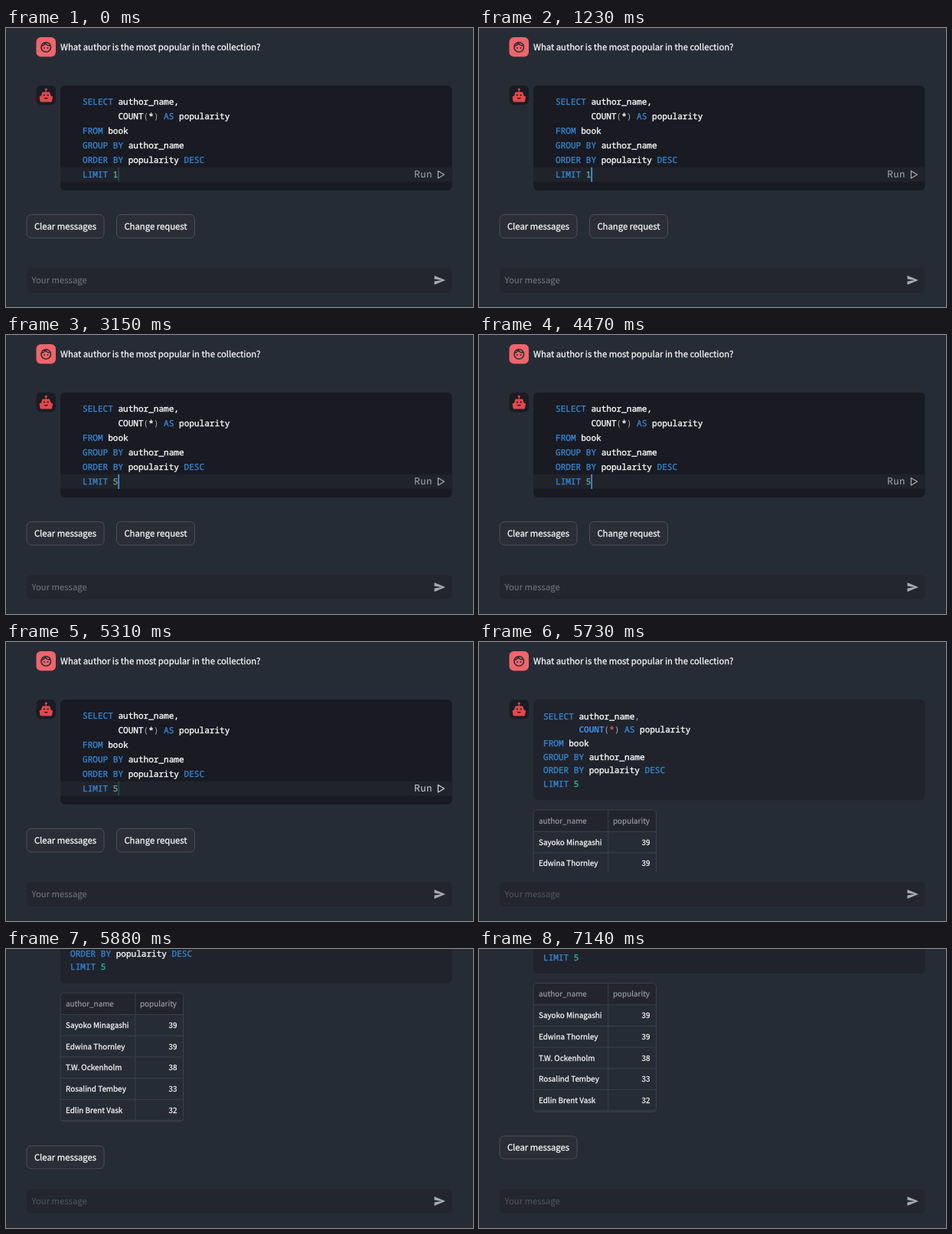
Recreate the animation shown at these times as an HTML page. Size 610 px wide and 364 px high, loop 7.98 s.

```html
<!DOCTYPE html>
<html lang="en">
<head>
<meta charset="utf-8">
<title>SQL chat</title>
<style>
  html, body { margin: 0; width: 100%; height: 100%; overflow: hidden; background: #262c35; }
  svg { display: block; width: 610px; height: 364px; }
  text, tspan { fill: currentColor; stroke: currentColor; }
  text {
    font: 11.3px "Noto Sans CJK JP", "Noto Sans CJK SC", "Noto Sans CJK KR", "Noto Sans CJK", Lato, sans-serif;
    color: #fafafa; stroke-width: .25px;
    text-rendering: geometricPrecision;
  }
  .code text { font: 500 11.05px "Noto Sans Mono", "DejaVu Sans Mono", monospace; stroke-width: .35px; }
  .code .key { color: #3585cf; }
  .code .fn { color: #3c8ee6; font-weight: 700; stroke: none; }
  .code .dim { color: #a3a8b0; stroke: none; }
  .code .star { color: #dd5653; }
  .code .num { color: #5fb08d; }
  .code .teal { color: #2bb89c; }
  .table text { font-size: 9.9px; }
  .table .head { color: #a2a5ab; stroke-width: .1px; }
  .table .count { text-anchor: end; }
  .line { fill: none; stroke: #3b4049; }
  .button rect { fill: #2b2e37; stroke: #4b4f58; }
  .button text { text-anchor: middle; }
  .run text { font-size: 12.2px; letter-spacing: .4px; color: #a9abb1; stroke: none; }
  .run path { fill: none; stroke: #a9abb1; stroke-width: 1.2; stroke-linejoin: round; }

  /* One loop is 7980 ms: 1% = 79.8 ms */
  .caret, .caret-spot, .caret-idle, .digit-old, .digit-new, .editor, .result, .scroll, .hint, .run {
    animation: 7980ms step-end infinite;
  }
  .caret { animation-name: blink; animation-timing-function: linear; }
  .caret-spot { animation-name: caret-spot; }
  .caret-idle { animation-name: idle; }
  .digit-old { animation-name: digit-old; }
  .digit-new { animation-name: digit-new; }
  .editor { animation-name: editor; }
  .result { animation-name: result; }
  .scroll { animation-name: scroll; }
  .hint { animation-name: hint; stroke-width: .1px; }
  .run { animation-name: hover; animation-timing-function: linear; }

  @keyframes blink {
    0%, 15.40% { opacity: 0; }
    15.41%, 20.67% { opacity: 1; }
    21.80%, 24.81% { opacity: 0; }
    26.69%, 34.96% { opacity: 1; }
    35.71%, 39.46% { opacity: 0; }
    39.47%, 44.73% { opacity: 1; }
    46.61%, 49.24% { opacity: 0; }
    50.75%, 56.01% { opacity: 1; }
    57.51%, 60.52% { opacity: 0; }
    62.03%, 66.53% { opacity: 1; }
    66.54%, 100% { opacity: 0; }
  }
  @keyframes caret-spot {
    0%, 39.47% { transform: none; }
    29.69% { transform: translateX(-6.63px); }
    100% { transform: none; }
  }
  @keyframes idle {
    0%, 66.54% { opacity: 1; }
    15.41%, 100% { opacity: 0; }
  }
  @keyframes digit-old { 0% { opacity: 1; } 29.69%, 100% { opacity: 0; } }
  @keyframes digit-new { 0% { opacity: 0; } 39.47%, 100% { opacity: 1; } }
  @keyframes editor { 0% { visibility: visible; } 71.80%, 100% { visibility: hidden; } }
  @keyframes result { 0% { visibility: hidden; } 71.80%, 100% { visibility: visible; } }
  @keyframes scroll {
    0% { transform: none; }
    71.96% { transform: none; animation-timing-function: cubic-bezier(.25, .46, .45, .94); }
    74.34%, 100% { transform: translateY(-174.5px); }
  }
  @keyframes hint { 0% { color: #70737a; } 71.80%, 100% { color: #4f535b; } }
  @keyframes hover {
    0%, 60.52% { filter: brightness(1); }
    62.03%, 100% { filter: brightness(1.25); }
  }
</style>
</head>
<body>
<svg viewBox="0 0 610 364">
  <defs>
    <clipPath id="view"><rect width="610" height="300"/></clipPath>
    <clipPath id="table-shape"><rect x="71" y="219" width="160.5" height="168" rx="5"/></clipPath>
  </defs>
  <rect width="610" height="364" fill="#262c35"/>

  <g clip-path="url(#view)">
    <g class="scroll">
      <rect x="39.5" y="12" width="25.5" height="25.5" rx="6" fill="#f0656c"/>
      <g fill="none" stroke="#2b2930" stroke-width="1.5">
        <circle cx="52.2" cy="25" r="6.3"/>
        <path d="M46.3 23.6Q50 23 51.2 19.8Q53.5 23.2 58.2 22.8"/>
      </g>
      <g fill="#2b2930"><circle cx="50" cy="26" r="1"/><circle cx="54.5" cy="26" r="1"/></g>
      <text x="71" y="29">What author is the most popular in the collection?</text>

      <rect x="39.5" y="75" width="25.5" height="25.5" rx="6" fill="#1a1c24"/>
      <g fill="#e5484d" stroke="#e5484d" stroke-linejoin="round">
        <circle cx="52.3" cy="80.2" r="1.1"/>
        <path d="M52.3 80V84M47.8 84H56.8L58 88.6L60.6 89.8L59.4 96H45.2L44 89.8L46.6 88.6Z"/>
      </g>
      <g fill="#1a1c24">
        <circle cx="49.9" cy="87.6" r="1.1"/><circle cx="54.7" cy="87.6" r="1.1"/>
        <path d="M49.4 91H55.2Q52.3 94.4 49.4 91Z"/>
      </g>

      <g class="editor">
        <rect x="71" y="75" width="511.5" height="137" rx="6" fill="#191a22"/>
        <rect x="71" y="181.7" width="511.5" height="19" fill="#21232b"/>
        <g class="code">
          <text x="100" y="100.3"><tspan class="key">SELECT</tspan> author_name,</text>
          <text x="146.4" y="119.2">COUNT<tspan class="dim">(</tspan>*<tspan class="dim">)</tspan> <tspan class="key">AS</tspan> popularity</text>
          <text x="100" y="138.2"><tspan class="key">FROM</tspan> book</text>
          <text x="100" y="157.1"><tspan class="key">GROUP BY</tspan> author_name</text>
          <text x="100" y="176.1"><tspan class="key">ORDER BY</tspan> popularity <tspan class="key">DESC</tspan></text>
          <text x="100" y="195" class="key">LIMIT</text>
          <text x="139.8" y="195" class="num digit-old">1</text>
          <text x="139.8" y="195" class="num digit-new">5</text>
        </g>
        <rect class="caret-idle" x="146.6" y="182" width="1" height="18.6" fill="#2c6470"/>
        <g class="caret-spot">
          <rect class="caret" x="146.4" y="181.8" width="1.6" height="19" fill="#4a9ae0"/>
        </g>
        <g class="run">
          <text x="533" y="195.3">Run</text>
          <path d="M564.4 186.4L572.4 191.2L564.4 196Z"/>
        </g>
        <g class="button">
          <rect x="27" y="243.5" width="101" height="30.5" rx="6"/>
          <text x="77.5" y="263">Clear messages</text>
        </g>
        <g class="button">
          <rect x="144.5" y="243.5" width="102" height="30.5" rx="6"/>
          <text x="195.5" y="263">Change request</text>
        </g>
      </g>

      <g class="result">
        <rect x="71" y="75" width="511.5" height="131.5" rx="6" fill="#20232c"/>
        <g class="code">
          <text x="84" y="100.8"><tspan class="key">SELECT</tspan> author_name<tspan class="dim">,</tspan></text>
          <text x="130.4" y="118.4"><tspan class="fn">COUNT</tspan><tspan class="dim">(</tspan><tspan class="star">*</tspan><tspan class="dim">)</tspan> <tspan class="key">AS</tspan> popularity</text>
          <text x="84" y="136.1"><tspan class="key">FROM</tspan> book</text>
          <text x="84" y="153.7"><tspan class="key">GROUP BY</tspan> author_name</text>
          <text x="84" y="171.4"><tspan class="key">ORDER BY</tspan> popularity <tspan class="key">DESC</tspan></text>
          <text x="84" y="189"><tspan class="key">LIMIT</tspan> <tspan class="teal">5</tspan></text>
        </g>
        <g class="table">
          <rect x="71" y="219" width="160.5" height="28.3" fill="#22252e" clip-path="url(#table-shape)"/>
          <path class="line" d="M71 247.3h160.5M71 275h160.5M71 302.7h160.5M71 330.4h160.5M71 358.1h160.5M71 385.3h160.5M168.8 219v166.3"/>
          <rect class="line" x="71" y="219" width="160.5" height="168" rx="5"/>
          <text class="head" x="78" y="236.8">author_name</text>
          <text class="head" x="175" y="236.8">popularity</text>
          <text x="78" y="264.6">Sayoko Minagashi</text><text class="count" x="223.5" y="264.6">39</text>
          <text x="78" y="292.3">Edwina Thornley</text><text class="count" x="223.5" y="292.3">39</text>
          <text x="78" y="320">T.W. Ockenholm</text><text class="count" x="223.5" y="320">38</text>
          <text x="78" y="347.7">Rosalind Tembey</text><text class="count" x="223.5" y="347.7">33</text>
          <text x="78" y="375.4">Edlin Brent Vask</text><text class="count" x="223.5" y="375.4">32</text>
        </g>
        <g class="button">
          <rect x="27" y="418.5" width="101" height="30" rx="6"/>
          <text x="77.5" y="437.8">Clear messages</text>
        </g>
      </g>
    </g>
  </g>

  <rect x="27" y="313" width="555.5" height="32" rx="6" fill="#23252f"/>
  <text class="hint" x="33.5" y="333.3">Your message</text>
  <path d="M559.5 323L574 329L559.5 335V330.4L569 329L559.5 327.6Z" fill="#a9abb0"/>
</svg>
</body>
</html>
```
